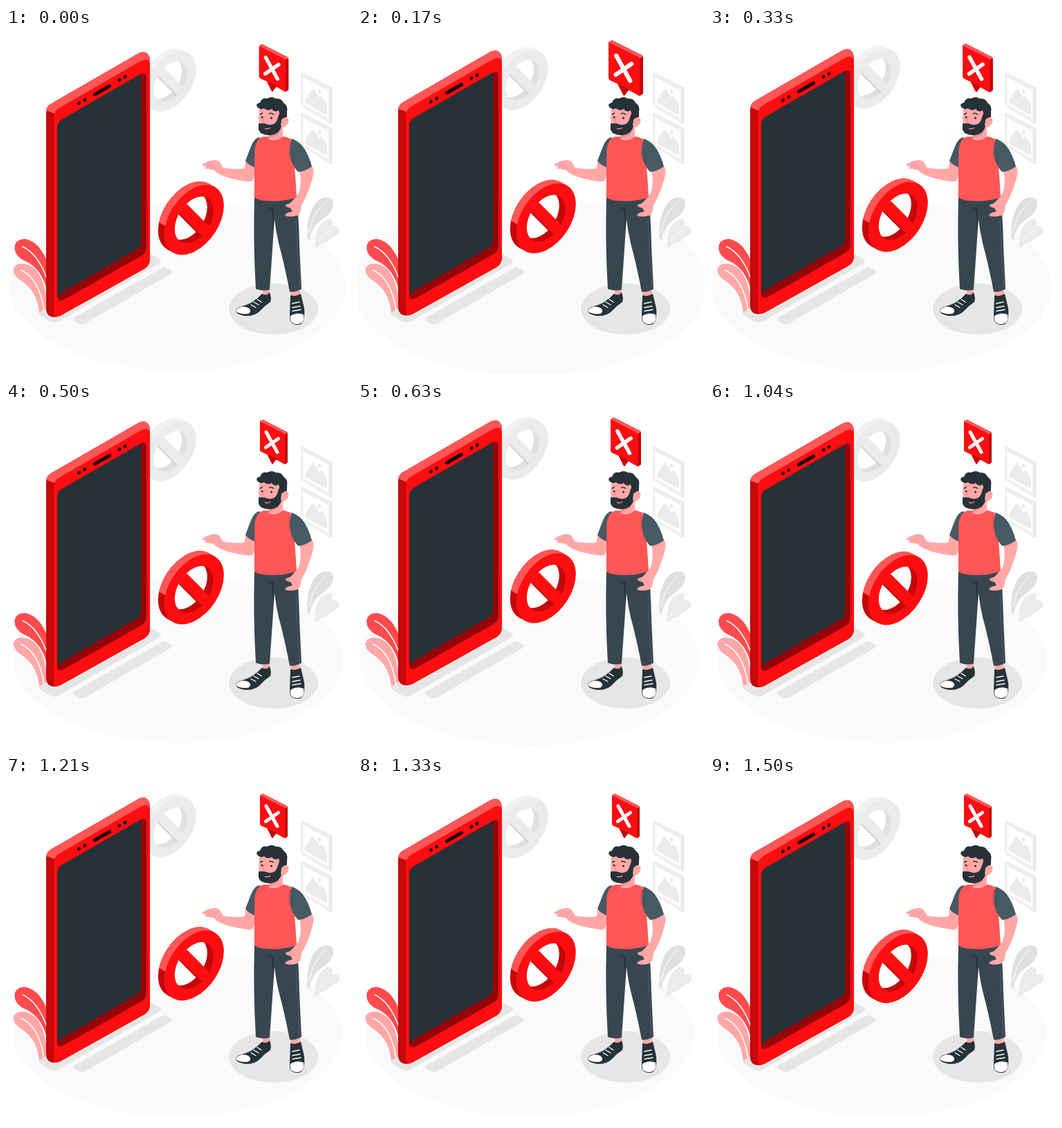
Write an HTML page that moves like this. It is 500 px wide and 500 px high and loops after 1540 ms.

```html
<!DOCTYPE html>
<html lang="en">
<head>
<meta charset="utf-8">
<title>Access denied</title>
<style>
html, body { margin: 0; width: 100%; height: 100%; overflow: hidden; background: #fff; }
svg { display: block; width: 100vw; height: 100vh; }
.red { --face: #ff0d10; --light: #ff5656; --dark: #c40709; --wall: #c40709; --edge: #b30709; }
.grey { --face: #ebebeb; --light: #f2f2f2; --dark: #f0f0f0; --wall: #e0e0e0; --edge: #c9c9c9; }
.skin { fill: #ffa8a7; }
.line { fill: none; stroke: #fff; stroke-linecap: round; stroke-linejoin: round; }
</style>
</head>
<body>
<svg viewBox="0 0 500 500">
<defs>
  <clipPath id="upper"><path d="M210 274L240 292L340 292V190H210Z"/></clipPath>
  <clipPath id="hole"><circle r="1" transform="matrix(28 -13.5 0 31 271.8 277.3)"/></clipPath>
  <g id="rim">
    <circle r="1" transform="matrix(43 -20.5 0 46.2 262.8 272.3)"/>
    <path d="M301.600 229.800L292.600 224.800L233 319.800L242 324.800Z"/>
  </g>
  <g id="ring">
    <use href="#rim" fill="var(--dark)"/>
    <use href="#rim" fill="var(--light)" clip-path="url(#upper)"/>
    <circle r="1" transform="matrix(43 -20.5 0 46.2 271.8 277.3)" fill="var(--face)"/>
    <g clip-path="url(#hole)">
      <path d="M230 230H320V330H230Z" fill="var(--wall)"/>
      <circle r="1" transform="matrix(28 -13.5 0 31 262.8 272.3)" fill="#fff"/>
      <path d="M230 230L320 320V340L230 250Z" fill="var(--edge)"/>
      <path d="M230 223L320 313V337.500L230 247.500Z" fill="var(--face)"/>
    </g>
  </g>
  <g id="picture">
    <path d="M426 65L428 64.500L471 87V137L469 138L426 112Z" fill="#e6e6e6"/>
    <path d="M426 65L469 88V137L426 112Z" fill="#f0f0f0"/>
    <path d="M429.500 71L466 91V131L429.500 110Z" fill="#fff"/>
    <path d="M432 108V104L441 90Q443 86 446 90L453 101Q455 97 458 101L464 113V126Z" fill="#ebebeb"/>
    <ellipse cx="453" cy="92" rx="2.500" ry="3.200" fill="#ebebeb"/>
  </g>
</defs>

<ellipse id="floor" cx="248" cy="373" rx="238" ry="120" fill="#fafafa"/>

<g fill="#e6e6e6">
  <path d="M49 409L198 326Q204 323 210 327L222 334Q226 337 222 340L76 424Q70 428 64 424L49 415Q45 412 49 409Z"/>
  <path d="M99 418L225 347Q228 345 232 347L238 350Q242 353 237 356L114 427Q109 430 105 427L98 423Q95 420 99 418Z"/>
  <ellipse cx="386.500" cy="406" rx="64.500" ry="37"/>
</g>

<use href="#picture"/>
<use href="#picture" y="58.500"/>

<g>
  <path d="M436 307C433 280 440 252 459 245Q473 243 473 254C472 272 452 276 446 288Q440 297 438 307Z" fill="#e0e0e0"/>
  <path class="line" d="M438 296Q443 266 462 252"/>
  <path d="M447 318C446 295 452 279 466 276Q474 276 471 286Q484 286 482 294C480 300 472 301 470 304Q466 309 456 312L449 318Z" fill="#ebebeb"/>
  <path class="line" d="M449 311Q457 296 474 291" stroke-width=".8"/>
</g>

<g>
  <path d="M59 380C55 358 42 342 24 335Q10 326 13 313Q17 304 28 305C46 308 58 328 64 352Z" fill="#ff4b4d"/>
  <path class="line" d="M24 316Q46 326 59 362" stroke-width="1.500"/>
  <path d="M48 411C46 386 34 373 20 364Q9 356 11 347Q16 339 27 341C47 345 57 365 60 404Z" fill="#ffa8a7"/>
  <path class="line" d="M22 350Q48 362 55 408" stroke-width="1.500"/>
</g>

<g class="float">
  <use class="grey" href="#ring" transform="translate(234 75.500) scale(.86) translate(-267.500 -275)"/>
</g>

<g class="float">
  <path d="M58 123Q58 113 65 109.500L189 38Q200 31.500 205 38Q208 41 208 48V334Q208 343 200 348L79 415.500Q69 420 62 415.500Q58 412 58 405Z" fill="#c40709"/>
  <path d="M58 119Q59 113 65 109.500L189 38Q200 31.500 205 38Q208 41 208 50L71 124Z" fill="#ff5656"/>
  <path d="M69 130Q69 120 77 115.500L194 48Q208 41 208 54V334Q208 343 200 348L79 415.500Q69 421 69 409Z" fill="#ff0d10"/>
  <path d="M74 144Q74 136 81 132L195 66.500Q203 63 203 71V317Q203 325 196 329L84 392.500Q74 397 74 388Z" fill="#960608"/>
  <path d="M74 144Q74 136 81 132L195 66.500V308Q195 316 189 319.500L82 381.500Q76 385 75 389L74 386Z" fill="#263238"/>
  <g fill="#150607">
    <ellipse cx="105.500" cy="108.700" rx="2.200" ry="2.700" transform="rotate(25 105.500 108.700)"/>
    <ellipse cx="113.700" cy="104" rx="2.200" ry="2.700" transform="rotate(25 113.700 104)"/>
    <ellipse cx="164" cy="75" rx="2.200" ry="2.700" transform="rotate(25 164 75)"/>
    <ellipse cx="172" cy="70.500" rx="2.200" ry="2.700" transform="rotate(25 172 70.500)"/>
  </g>
  <path d="M128.500 96L149.500 84" stroke="#150607" stroke-width="5" stroke-linecap="round"/>
</g>

<g class="float"><use class="red" href="#ring"/></g>

<g id="man">
  <path class="skin" d="M371 375L381 376V389L371 388ZM411 377L424 376L425 388L412 389Z"/>
  <path d="M370 384Q376 388 381 382Q384 390 382 396Q374 401 367 409Q359 417 345 416Q333 414 332 409Q332 404 342 402Q357 398 370 384Z" fill="#263238"/>
  <path d="M340 403Q348 402 352 406Q355 410 350 413Q336 414 332 409Q333 405 340 403Z" fill="#fff"/>
  <path class="line" d="M354 400L361 404M358 396L365 400M363 392L369 396" stroke-width="1.400"/>
  <path d="M411 386Q418 389 426 384L431 405Q433 428 422 429Q409 429 410 417Z" fill="#263238"/>
  <path d="M411 416Q420 410 430 414Q432 427 421 428Q409 428 411 416Z" fill="#fff"/>
  <path class="line" d="M414 409L426 407M414 404L425 402M414 398L424 396" stroke-width="1.400"/>

  <path d="M359 244H420Q423 270 424 315L427 377Q419 382 410 381Q402 340 394 311Q390 294 388 276L386 305L381 378Q372 381 361 377Q357 310 359 244Z" fill="#37474f"/>
  <path d="M372 256Q380 260 387 261L387 290Q384 272 385 263Z" fill="#263238"/>
  <path d="M419 275Q421 320 424 377" fill="none" stroke="#53646c" stroke-width=".8"/>

  <path class="skin" d="M346 193L360 200L359 212Q359 223 350 222Q326 219 312 213Q306 211 300 205L288 203Q285 202 290 200L283 199Q283 196 294 192Q305 189 309 194L314 202Q330 205 345 203Z"/>
  <path d="M290 200L299 199M296 203L302 202" fill="none" stroke="#f28f8f" stroke-width=".8"/>
  <path d="M345 203L347 207" stroke="#f28f8f" fill="none"/>
  <path class="skin" d="M424 204L442 199Q447 206 442 220Q436 241 427 256Q426 269 421 271Q410 274 403 271Q404 267 414 265L411 260Q403 259 404 255Q412 254 416 247L423 239Q428 224 424 204Z"/>
  <path d="M404 256Q411 259 418 258" fill="none" stroke="#f28f8f" stroke-width=".8"/>

  <path d="M367 158Q359 158 354 171L346 192Q351 199 361 202L370 165Z" fill="#455a64"/>
  <path d="M372 157L403 157Q413 159 415 168L420 244Q405 251 382 250Q366 250 359 245L359 180Q360 160 372 157Z" fill="#ff5656"/>
  <path d="M408 159Q419 160 428 170Q437 181 442 200Q433 207 422 208Q411 196 410 180Q410 166 413 161Z" fill="#455a64"/>

  <path class="skin" d="M379 143H400V157Q391 165 380 161Z"/>
  <path d="M380 153Q391 152 396 145L394 153Q388 158 380 158Z" fill="#f28f8f"/>
  <path class="skin" d="M367 114Q380 109 397 115L400 144Q389 153 377 153Q367 151 366 142Q364 127 367 114Z"/>
  <path d="M365 138Q372 137 377 139Q390 143 393 129L397 118H405Q408 128 403 133L398 142Q395 154 381 155Q368 155 365 147Z" fill="#263238"/>
  <path d="M363 114Q360 109 367 108Q370 100 377 102Q384 98 390 102Q398 101 401 108Q408 112 406 121Q407 128 403 133L396 131Q396 124 394 119Q388 123 384 117Q378 121 373 116Q367 119 363 114Z" fill="#263238"/>
  <path class="skin" d="M398 133Q404 126 408 131Q410 137 404 142Q399 145 397 141Z"/>
  <path d="M401 136Q403 132 406 133" fill="none" stroke="#f28f8f"/>
  <path d="M374 127Q370 134 371 136L375 137" fill="none" stroke="#f07f7f" stroke-width="1"/>
  <path d="M367 125L371 123M380 124Q383 122 387 125" fill="none" stroke="#263238" stroke-width="1.500"/>
  <circle cx="370" cy="129" r="1.500" fill="#263238"/>
  <circle cx="383.500" cy="130" r="1.600" fill="#263238"/>
  <path d="M374 145Q378 147 382 144" fill="none" stroke="#ff8080" stroke-width="1.500"/>
</g>

<g id="bubble">
  <path d="M367 28L371 25.500L405.500 43Q407 44 407 46V87.500L403 90L390.500 83L385 90L378 76Z" fill="#c40709"/>
  <path d="M367 28.500L370 26Q371 25.500 373 26.500L405.500 43Q407 44 406.500 45L402.500 47Z" fill="#ff5656"/>
  <path d="M367 30Q367 28 369 29L401 45Q403 46 403 48V88Q403 90 401 89L386.500 81L384 89L377.500 76L369 72Q367 71 367 69Z" fill="#ff0d10"/>
  <path d="M378 76L391 82L385 90Z" fill="#c40709"/>
  <path class="line" d="M376 43.500L392 72.500M393.500 53L375.500 65.500" stroke-width="5"/>
</g>
</svg>
<script>
const LOOP = 1540;
const floor = document.getElementById('floor');
const bubble = document.getElementById('bubble');
const floats = document.querySelectorAll('.float');

// [progress, strength] of the double heartbeat
const beat = [[0, 0], [.1, 1], [.3, 0], [.4, 0], [.5, 1], [.6, 0], [1.1, 0]];

function pulse(p) {
  const i = beat.findIndex(([at]) => at > p);
  const [a, from] = beat[i - 1], [b, to] = beat[i];
  return from + (to - from) * (p - a) / (b - a);
}

function scale(el, x, y, s) {
  el.setAttribute('transform', `translate(${x} ${y}) scale(${s}) translate(${-x} ${-y})`);
}

function draw(now) {
  const p = (33 + now % LOOP * .976) / 1500;
  const lift = 10 * Math.max(0, 1 - Math.abs(2 * p - 1));
  floats.forEach(el => el.setAttribute('transform', `translate(0 ${.4 - lift})`));
  const k = pulse(p);
  scale(floor, 248, 373, 1 + .1 * k);
  scale(bubble, 387, 57.5, 1 + .3 * k);
}

const start = performance.now();
function tick() {
  draw(performance.now() - start);
  requestAnimationFrame(tick);
}
tick();
</script>
</body>
</html>
```
